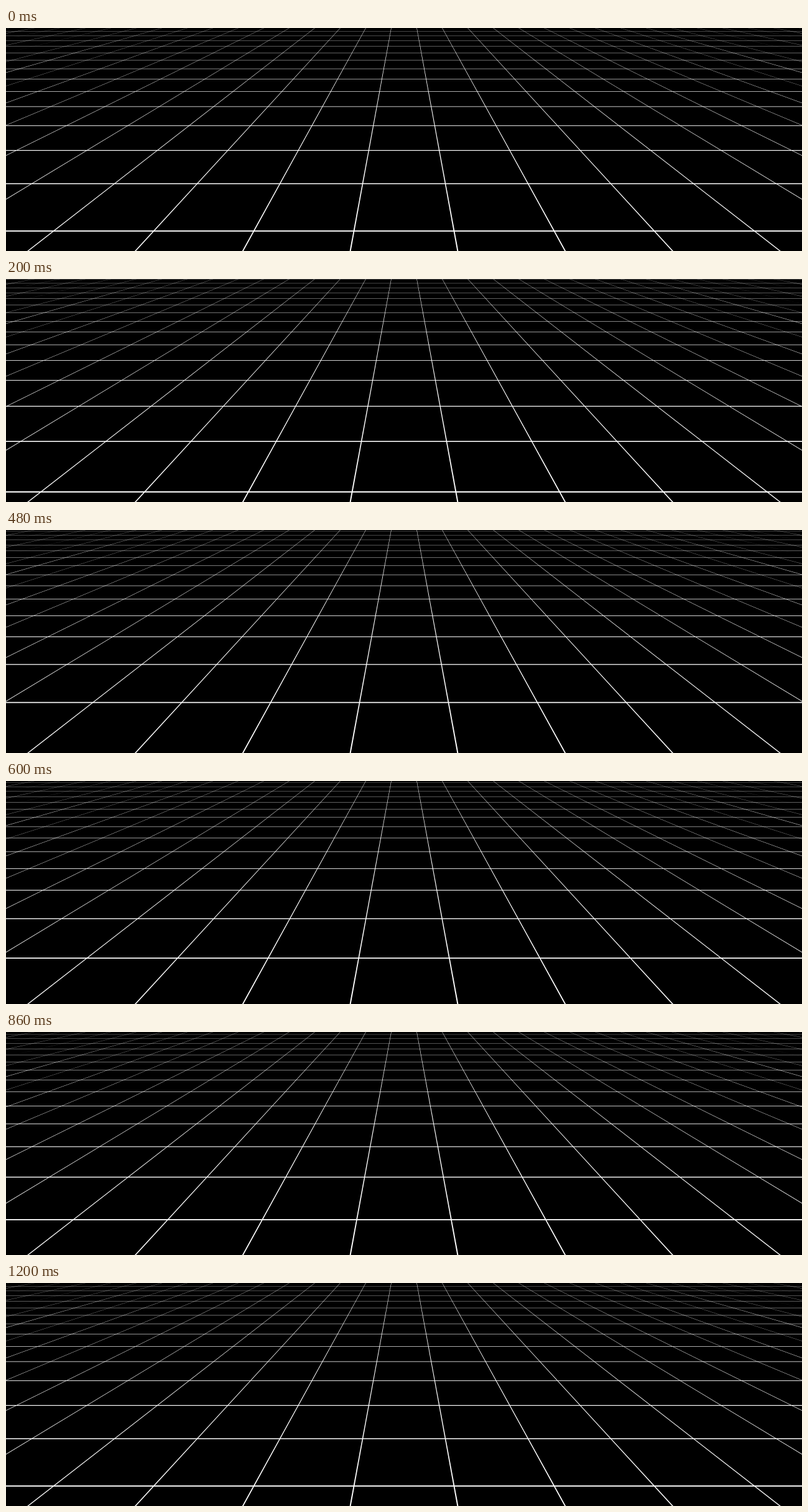
Recreate the animation shown at these times as an HTML page with a canvas. Size 1280 by 360 pixels, loop 1220 ms.

```html
<!DOCTYPE html>
<html lang="en">
<head>
<meta charset="utf-8">
<title>Perspective grid</title>
<style>
  html, body { margin: 0; width: 100%; height: 100%; overflow: hidden; background: #000; }
  canvas { display: block; }
</style>
</head>
<body>
<canvas id="stage" width="1280" height="360"></canvas>
<script>
const W = 1280, H = 360;
const HORIZON = -112;     // y of the vanishing point
const DEPTH = 2093;       // y - HORIZON = DEPTH / z
const SPREAD = 0.3661;    // column spacing per pixel below the horizon
const NEAREST = 4.76;     // z of the first row at the start of the loop
const LOOP = 1220, TRAVEL = 1200, STEP = 20;

const ctx = document.getElementById('stage').getContext('2d');

function drawColumn(k) {
  const slope = k * SPREAD;
  const thickness = 0.0115 * SPREAD * Math.hypot(1, slope) ** 0.25;
  const edge = (y, side) => W / 2 + (y - HORIZON) * (slope + side * thickness / 2);
  ctx.beginPath();
  ctx.moveTo(edge(0, -1), 0);
  ctx.lineTo(edge(0, 1), 0);
  ctx.lineTo(edge(H, 1), H);
  ctx.lineTo(edge(H, -1), H);
  ctx.fill();
}

function drawRow(z) {
  const drop = DEPTH / z;
  const thickness = 2 * (drop / 440) ** 1.5;
  ctx.fillRect(0, HORIZON + drop - thickness / 2, W, thickness);
}

function draw(now) {
  const time = Math.floor((now % LOOP) / STEP) * STEP;
  ctx.fillStyle = '#000';
  ctx.fillRect(0, 0, W, H);
  ctx.fillStyle = '#fff';
  for (let k = -15.5; k <= 15.5; k++) drawColumn(k);
  for (let n = 0; n <= 16; n++) drawRow(NEAREST + n - time / TRAVEL);
  requestAnimationFrame(draw);
}

draw(0);
</script>
</body>
</html>
```
